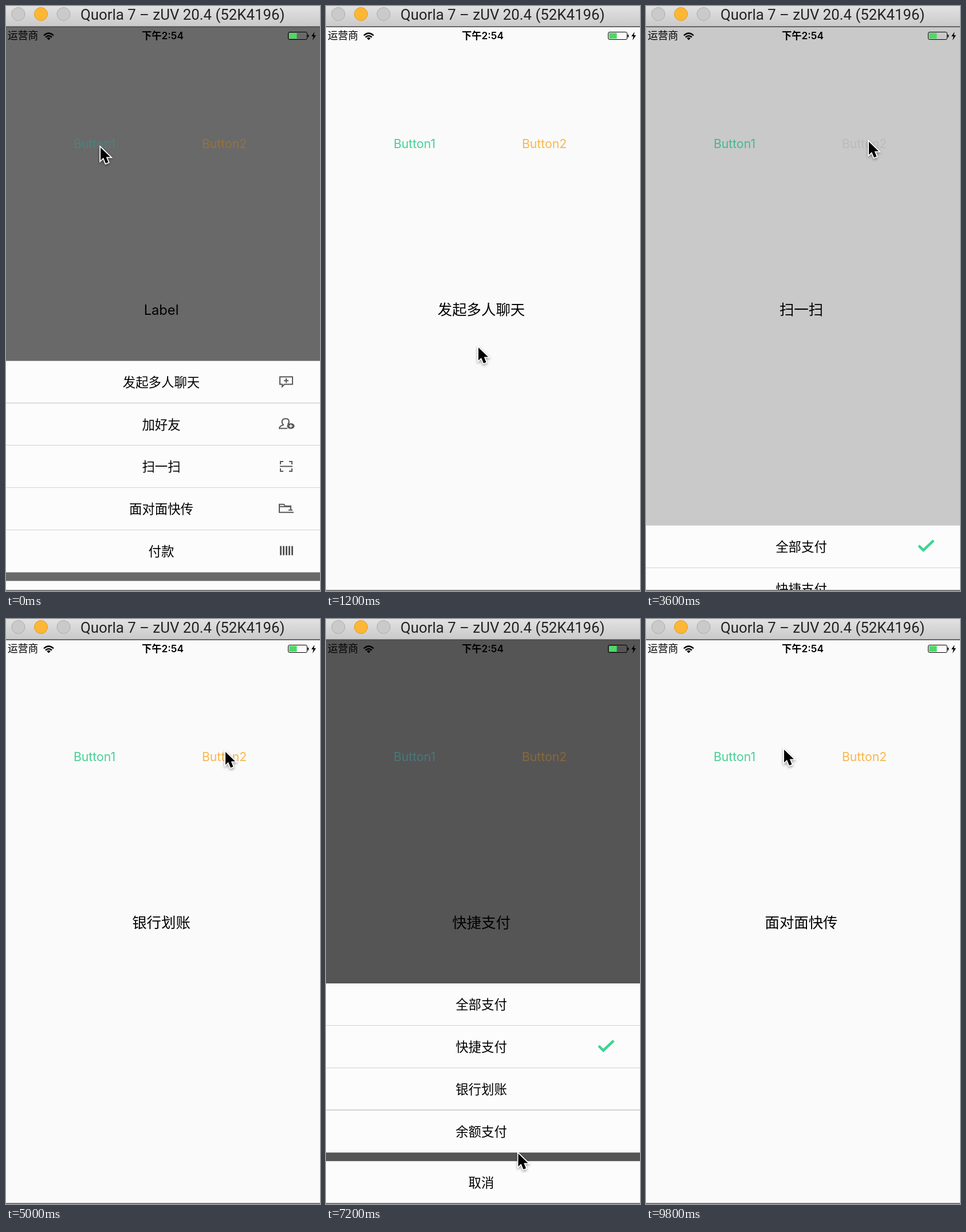
An HTML page with a canvas that plays this animation: 548x1021 px, repeating every 10000 ms.

```html
<!DOCTYPE html>
<html lang="zh-CN">
<head>
<meta charset="utf-8">
<title>Action sheet demo</title>
<style>
html, body { margin: 0; width: 100%; height: 100%; overflow: hidden; background: #fafafa; }
canvas { display: block; width: 548px; height: 1021px; }
</style>
</head>
<body>
<canvas id="stage" width="548" height="1021"></canvas>
<script>
const ctx = document.getElementById('stage').getContext('2d');
const LOOP = 10000, STEP = 200, ROW = 73.8, GAP = 15, FLOOR = 1020, DIM = .66;
const UI = 'Inter, "Noto Sans CJK SC", "Noto Sans CJK", sans-serif';

const chatMenu = {
  button: 0,
  pickX: 264,
  rows: ['发起多人聊天', '加好友', '扫一扫', '面对面快传', '付款', '取消'],
  icons: [chatIcon, friendIcon, scanIcon, folderIcon, barsIcon]
};
const payMenu = {
  button: 1,
  pickX: 330,
  checkable: true,
  rows: ['全部支付', '快捷支付', '银行划账', '余额支付', '取消']
};

// Each session: press the button at tip, then choose a row
const sessions = [
  { menu: chatMenu, open: -150, close: 900, pick: 0, tip: [163, 244] },
  { menu: chatMenu, open: 1700, close: 2700, pick: 2, tip: [160, 245] },
  { menu: payMenu, open: 3567, close: 4450, pick: 2, tip: [387, 234] },
  { menu: payMenu, open: 5190, close: 5570, pick: 1, tip: [381, 229] },
  { menu: payMenu, open: 6500, close: 7350, pick: 4, tip: [385, 238] },
  { menu: chatMenu, open: 8300, close: 9200, pick: 3, tip: [157, 244] }
];

const buttons = [
  { text: 'Button1', x: 154.5, color: [69, 209, 150], dim: [72, 120, 122] },
  { text: 'Button2', x: 381, color: [249, 182, 76], dim: [136, 104, 60] }
];

const clamp = v => Math.max(0, Math.min(1, v));
const mix = (a, b, k) => a + (b - a) * k;
const easeOut = v => 1 - (1 - clamp(v)) ** 3;
const smooth = v => v * v * (3 - 2 * v);

const isCancel = (menu, i) => i === menu.rows.length - 1;
const sheetHeight = menu => menu.rows.length * ROW + GAP;
const rowTop = (menu, i) => i * ROW + (isCancel(menu, i) ? GAP : 0);

// The pointer rests on the button, travels to the row, rests and moves on
const stops = sessions.flatMap(({ menu, open, close, pick, tip }) => {
  const y = FLOOR - sheetHeight(menu) + rowTop(menu, pick) + ROW / 2 - 6;
  const row = [menu.pickX, y];
  return [[open - 190, tip], [open + 150, tip], [close - 50, row], [close + 330, row]];
});
stops.push([9800, [239, 225]], [LOOP, [239, 225]]);

function pointerAt(t) {
  const i = stops.findIndex(([time]) => time > t);
  const [t0, from] = stops[i - 1], [t1, to] = stops[i];
  const k = smooth((t - t0) / (t1 - t0));
  return from.map((v, n) => mix(v, to[n], k));
}

function text(str, x, y, size, color = '#000', opts = {}) {
  ctx.font = `${opts.weight || 400} ${size}px ${opts.family || UI}`;
  ctx.textAlign = opts.align || 'center';
  ctx.fillStyle = color;
  ctx.fillText(str, x, y);
}

function rect(x, y, w, h, color) {
  ctx.fillStyle = color;
  ctx.fillRect(x, y, w, h);
}

function line(d, color, width) {
  ctx.strokeStyle = color;
  ctx.lineWidth = width;
  ctx.stroke(new Path2D(d));
}

function fill(d, color) {
  ctx.fillStyle = color;
  ctx.fill(new Path2D(d));
}

function disc(x, y, r, color, edge, width = 1) {
  ctx.beginPath();
  ctx.arc(x, y, r, 0, 7);
  if (color) { ctx.fillStyle = color; ctx.fill(); }
  ctx.strokeStyle = edge;
  ctx.lineWidth = width;
  ctx.stroke();
}

// Icons are drawn around the middle of the row's icon slot
const INK = '#58585a';
function chatIcon() {
  line('M-11-9H11V4H-3L-7 8V4H-11ZM-4-2.5H4M0-6.5V1.5', INK, 2);
}
function friendIcon() {
  line('M2 7H-12C-12 3-8 2-5 1C-9-4-8-10-1-10C6-10 6-4 3 0', INK, 2);
  fill('M1.5 3A6.5 5 0 0 1 14.5 3A6.5 5 0 0 1 1.5 3', INK);
  line('M5 3H11M8 0V6', '#fcfcfc', 1.6);
}
function scanIcon() {
  line('M-10-4V-9H-5M5-9H10V-4M10 3V8H5M-5 8H-10V3M-11-.5H11', INK, 2);
}
function folderIcon() {
  line('M7 6H-12V-8H-4L-2-5H8V1M-12-4H8M4 2H11M5 6H13', INK, 2);
}
function barsIcon() {
  for (let i = 0; i < 5; i++) rect(-11 + i * 5, -9, 3, 16, INK);
}
function checkIcon() {
  line('M-13-1.7L-5 6.3L13-10.7', '#42d293', 4.5);
}

function drawSheet(menu, checked, shown) {
  const top = FLOOR - shown * sheetHeight(menu);
  menu.rows.forEach((label, i) => {
    const y = top + rowTop(menu, i);
    rect(0, y, 548, ROW, '#fcfcfc');
    if (i && !isCancel(menu, i)) rect(0, Math.round(y) - 1, 548, 1, '#d3d3d5');
    text(label, 271, y + ROW / 2 + 8.5, 22.4);
    const icon = menu.checkable ? i === checked && checkIcon : menu.icons[i];
    if (!icon) return;
    ctx.save();
    ctx.translate(489, y + ROW / 2);
    icon();
    ctx.restore();
  });
}

function drawStatus() {
  text('运营商', 3, 58, 17.7, '#000', { align: 'left' });
  text('下午2:54', 273.5, 58, 17.3, '#000', { weight: 600 });
  line('M66 51.5Q74.5 43.5 83 51.5M69 54.5Q74.5 49.5 80 54.5', '#000', 2.4);
  fill('M71.3 56.2Q74.5 53.5 77.7 56.2L74.5 59.5Z', '#000');
  ctx.beginPath();
  ctx.roundRect(492.5, 45.5, 33, 13, 2.5);
  ctx.strokeStyle = '#000';
  ctx.lineWidth = 1;
  ctx.stroke();
  rect(494, 47, 13.5, 10, '#4cd964');
  rect(526.5, 50, 1.8, 4.5, '#000');
  fill('M538.5 45L533 53H536.5L535 60L541 51H537.3Z', '#000');
}

function drawTitleBar() {
  const shade = ctx.createLinearGradient(0, 0, 0, 36);
  shade.addColorStop(0, '#e2e2e2');
  shade.addColorStop(1, '#c9c9c9');
  rect(0, 0, 548, 36, shade);
  rect(0, 35.5, 548, 1.5, '#444');
  for (let i = 0; i < 3; i++) {
    const [color, edge] = i === 1 ? ['#fdb734', '#dd9b2b'] : ['#cacaca', '#acacac'];
    disc(21.5 + i * 39.5, 14, 11.5, color, edge);
  }
  text('Quorla 7 – zUV 20.4 (52K4196)', 130, 24, 25.8, '#222',
    { align: 'left', family: 'Roboto, sans-serif' });
}

function drawButton(b, shown, active) {
  const rgb = b.color.map((c, n) =>
    mix(232 * (1 - DIM * shown), mix(c, b.dim[n], shown), active));
  text(b.text, b.x, 248, 21.2, `rgb(${rgb})`);
}

function drawPointer(x, y) {
  const arrow = new Path2D('M2 3V25.5L7 20.8L11 30.5L15.5 28.7L11.8 19.5H19Z');
  ctx.save();
  ctx.translate(x, y);
  ctx.shadowColor = 'rgba(0,0,0,.4)';
  ctx.shadowBlur = 4;
  ctx.shadowOffsetY = 2;
  ctx.strokeStyle = '#fff';
  ctx.lineWidth = 3.5;
  ctx.stroke(arrow);
  ctx.shadowColor = 'transparent';
  ctx.fillStyle = '#000';
  ctx.fill(arrow);
  ctx.restore();
}

function draw(t) {
  let label = 'Label', menu = null, shown = 0, pressed = false, checked = 0, picked = 0;
  const active = [1, 1];
  for (const s of sessions) {
    if (t > s.open - 130 && t < s.close + 200) {
      menu = s.menu;
      checked = picked;
      pressed = t < s.open;
      shown = easeOut((t - s.open) / 300) * (1 - easeOut((t - s.close) / 200));
      active[menu.button] = clamp((t - s.open - 40) / 110);
    }
    if (t >= s.close) label = s.menu.rows[s.pick];
    if (s.menu.checkable && !isCancel(s.menu, s.pick)) picked = s.pick;
  }

  rect(0, 0, 548, 1021, '#fafafa');
  rect(0, 37, 548, 983, `rgba(0,0,0,${DIM * shown})`);
  drawStatus();
  buttons.forEach((b, i) => drawButton(b, shown, active[i]));
  text(label, 271, 539, label === 'Label' ? 23.7 : 25.4);
  if (menu) drawSheet(menu, checked, shown);
  rect(0, 1019, 548, 2, '#777');
  drawTitleBar();

  const [x, y] = pointerAt(t);
  if (pressed) disc(x + .5, y + 2.5, 42.5, null, '#000', 3);
  drawPointer(x, y);
}

const start = performance.now();
function tick() {
  const t = Math.max(0, performance.now() - start) % LOOP;
  draw(Math.floor(t / STEP) * STEP);
  requestAnimationFrame(tick);
}
tick();
</script>
</body>
</html>
```
